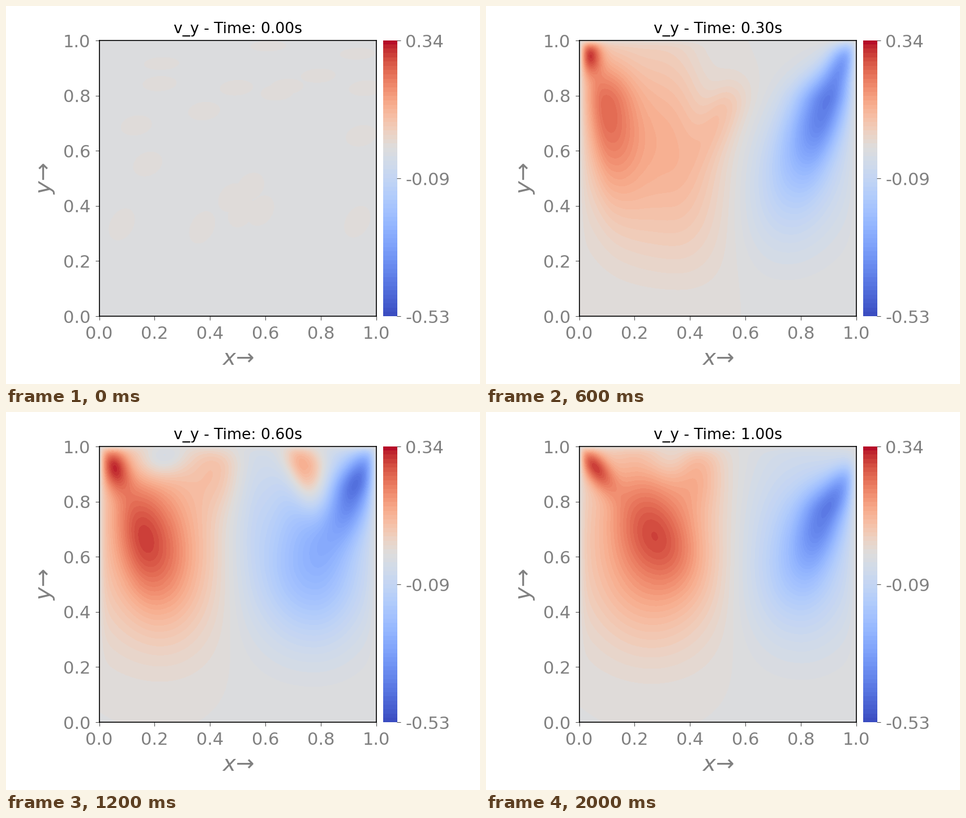
A matplotlib script that plays this animation: 837x669 px, repeating every 2.2 s.

```python
import numpy as np
import matplotlib.pyplot as plt
from matplotlib.animation import FuncAnimation

W, H, DPI = 837, 669, 100
LEFT, RIGHT, TOP, BOTTOM = 164.5, 654, 61, 549
GREY = "#808080"
VMIN, VMAX, STEP = -0.53, 0.34, 0.0136
BELOW, ABOVE = 39, 25
N = 488

axis = (np.arange(N) + 0.5) / N
X, Y = np.meshgrid(axis, axis)
# the velocity vanishes on all four walls
WALLS = (np.tanh(X / 0.018) * np.tanh((1 - X) / 0.025)
         * np.tanh((1 - Y) / 0.018) * np.tanh(Y / 0.15))

mids = (np.arange(-BELOW, ABOVE) + 0.5) * STEP
BANDS = plt.get_cmap("coolwarm")(
    0.5 + 0.5 * np.where(mids > 0, mids / VMAX, mids / -VMIN))[:, :3]


def ramp(t, start, end):
    s = np.clip((t - start) / (end - start), 0, 1)
    return s * s * (3 - 2 * s)


def pulse(t, centre, width):
    return np.exp(-((t - centre) / width) ** 2)


def lobe(x, y, strength, left, right, down, up, lean=0):
    """Bump with its own half-width on each side, leaning along y."""
    dy = Y - y
    dx = X - x - lean * dy
    wx = np.where(dx < 0, left, right)
    wy = np.where(dy < 0, down, up)
    return strength * 2.0 ** -((dx / wx) ** 2 + (dy / wy) ** 2)


def rising(t):
    """Upward flow along the left wall."""
    young = 1 - ramp(t, 0.2, 0.4)
    drift = max(0, (t - 0.5) / 0.5) ** 0.7
    swirl = pulse(t, 0.5, 0.07)
    sink = pulse(t, 0.45, 0.08)
    size = 1 - 0.4 * young

    core = lobe(0.09 + 0.18 * drift, 0.69 + 0.16 * young,
                0.15 + 0.05 * young - 0.05 * drift + 0.03 * swirl,
                0.06 + 0.05 * drift, 0.09 + 0.02 * drift,
                0.2 - 0.05 * drift + 0.1 * young, 0.18 - 0.08 * young,
                -0.1 - 0.25 * drift)
    spread = lobe(0.2 + 0.22 * young + 0.06 * drift, 0.62,
                  0.165 - 0.07 * young + 0.03 * drift,
                  0.2 + 0.08 * young, 0.17 - 0.04 * swirl + 0.03 * drift,
                  0.35 - 0.08 * ramp(t, 0.4, 0.5), 0.32, -0.2 * young)
    corner = lobe(0.05 - 0.03 * young, 0.93 + 0.04 * young - 0.075 * sink,
                  0.24 - 0.18 * sink, 0.045 * size, 0.045 * size,
                  0.07 * size, 0.06 * size, -0.5 * drift)
    crest = lobe(0.43, 0.92, 0.07 * ramp(t, 0.5, 0.6),
                 0.07, 0.07, 0.12, 0.06)
    notch = lobe(0.18 + 0.15 * drift, 0.96,
                 (0.09 * drift - 0.14) * ramp(t, 0.4, 0.5),
                 0.07, 0.07, 0.065, 0.06, 0.3 * (1 - drift))
    return core + spread + corner + crest + notch


def crossing(t):
    """Small eddy that travels right under the lid."""
    s = t - 0.4
    gap = lobe(0.46, 0.86, -0.06 * pulse(t, 0.4, 0.08), 0.06, 0.06, 0.2, 0.2)
    up = lobe(0.59 + 0.75 * s, 0.8 + 0.6 * s, 0.28 * pulse(t, 0.52, 0.18),
              0.055, 0.07, 0.14, 0.085, 0.15 - 2.2 * s)
    down = lobe(0.55, 0.78, -0.2 * pulse(t, 0.5, 0.07),
                0.1, 0.045, 0.22, 0.25)
    return gap + up + down


def falling(t):
    """Downward flow along the right wall."""
    young = 1 - ramp(t, 0.2, 0.4)
    drift = max(0, (t - 0.5) / 0.5) ** 0.7
    lift = pulse(t, 0.52, 0.15)
    sag = pulse(t, 0.8, 0.1)

    core = lobe(0.885 + 0.04 * lift, 0.76 + 0.1 * lift - 0.07 * sag,
                -0.36 + 0.08 * ramp(t, 0.4, 0.7),
                0.08 + 0.03 * young, 0.07,
                0.17 + 0.05 * young - 0.03 * lift, 0.1, 0.28 - 0.25 * sag)
    corner = lobe(0.955, 0.93 - 0.06 * ramp(t, 0.8, 1),
                  -0.27 + 0.11 * ramp(t, 0.2, 0.6),
                  0.05, 0.05, 0.08, 0.06, 0.35)
    spread = lobe(0.76 + 0.06 * young + 0.04 * drift, 0.58 - 0.13 * young,
                  -0.16 + 0.08 * young - 0.08 * pulse(t, 0.6, 0.07),
                  0.17 - 0.04 * young + 0.06 * pulse(t, 0.5, 0.07), 0.15,
                  0.23, 0.2 + 0.1 * ramp(t, 0.4, 0.6),
                  0.3 * (1 - young) * (1 - ramp(t, 0.45, 0.6)))
    return core + corner + spread


def rest_field():
    """Fluid at rest: faint patches, flat under the lid, rounder below."""
    rng = np.random.default_rng(4)
    v = np.full_like(X, -0.005)
    for _ in range(20):
        depth = 0.7 * rng.random() ** 2
        dy = Y - (1 - depth)
        dx = X - rng.random() - 0.25 * dy
        rx, ry = 0.065 - 0.03 * depth, 0.018 + 0.06 * depth
        v[(dx / rx) ** 2 + (dy / ry) ** 2 < 1] = 0.005
    return v


def field(t):
    if t == 0:
        return rest_field()
    flow = rising(t) + crossing(t) + falling(t)
    return WALLS * (min(t / 0.2, 1) * flow - 0.003)


def paint(v):
    i = np.floor(v / STEP).astype(int) + BELOW
    return BANDS[np.clip(i, 0, BELOW + ABOVE - 1)]


def add_axes(x0, x1):
    return fig.add_axes([x0 / W, 1 - BOTTOM / H,
                         (x1 - x0) / W, (BOTTOM - TOP) / H])


def show(axes, colours, extent):
    return axes.imshow(colours, extent=extent, origin="lower",
                       aspect="auto", interpolation="nearest")


def label(x, y, text, **kw):
    return fig.text(x / W, 1 - y / H, text, ha="center", va="baseline", **kw)


plt.rcParams["font.family"] = "DejaVu Sans"
# the tiny surplus keeps the pixel size from rounding down
fig = plt.figure(figsize=((W + 0.01) / DPI, (H + 0.01) / DPI), dpi=DPI,
                 facecolor="white")
tick_style = dict(labelsize=22, labelcolor=GREY, color="#505050",
                  length=5, width=0.8, pad=5.8)

ax = add_axes(LEFT, RIGHT)
image = show(ax, paint(field(0)), (0, 1, 0, 1))
ticks = np.arange(6) / 5
ax.set_xticks(ticks, [f"{v:.1f}" for v in ticks])
ax.set_yticks(ticks, [f"{v:.1f}" for v in ticks])
ax.tick_params(**tick_style)
ax.tick_params(axis="x", pad=6.9)
for spine in ax.spines.values():
    spine.set_linewidth(1.2)

bar = add_axes(666, 690)
show(bar, BANDS[:, None], (0, 1, VMIN, VMAX))
bar.set_xticks([])
bar.yaxis.tick_right()
bar.set_yticks([VMIN, (VMIN + VMAX) / 2, VMAX], ["-0.53", "-0.09", "0.34"])
bar.tick_params(**tick_style)
for spine in bar.spines.values():
    spine.set_visible(False)

title = label(409.25, 48, "", fontsize=19.2, color="black")
label(409.25, 634.5, "$x$→", fontsize=28, color=GREY)
label(78.5, 305, "$y$→", fontsize=28, color=GREY, rotation=90,
      rotation_mode="anchor")


def draw(n):
    t = n / 10
    image.set_data(paint(field(t)))
    title.set_text(f"v_y - Time: {t:.2f}s")
    return image, title


anim = FuncAnimation(fig, draw, frames=11, interval=200, repeat=True)
plt.show()
```
